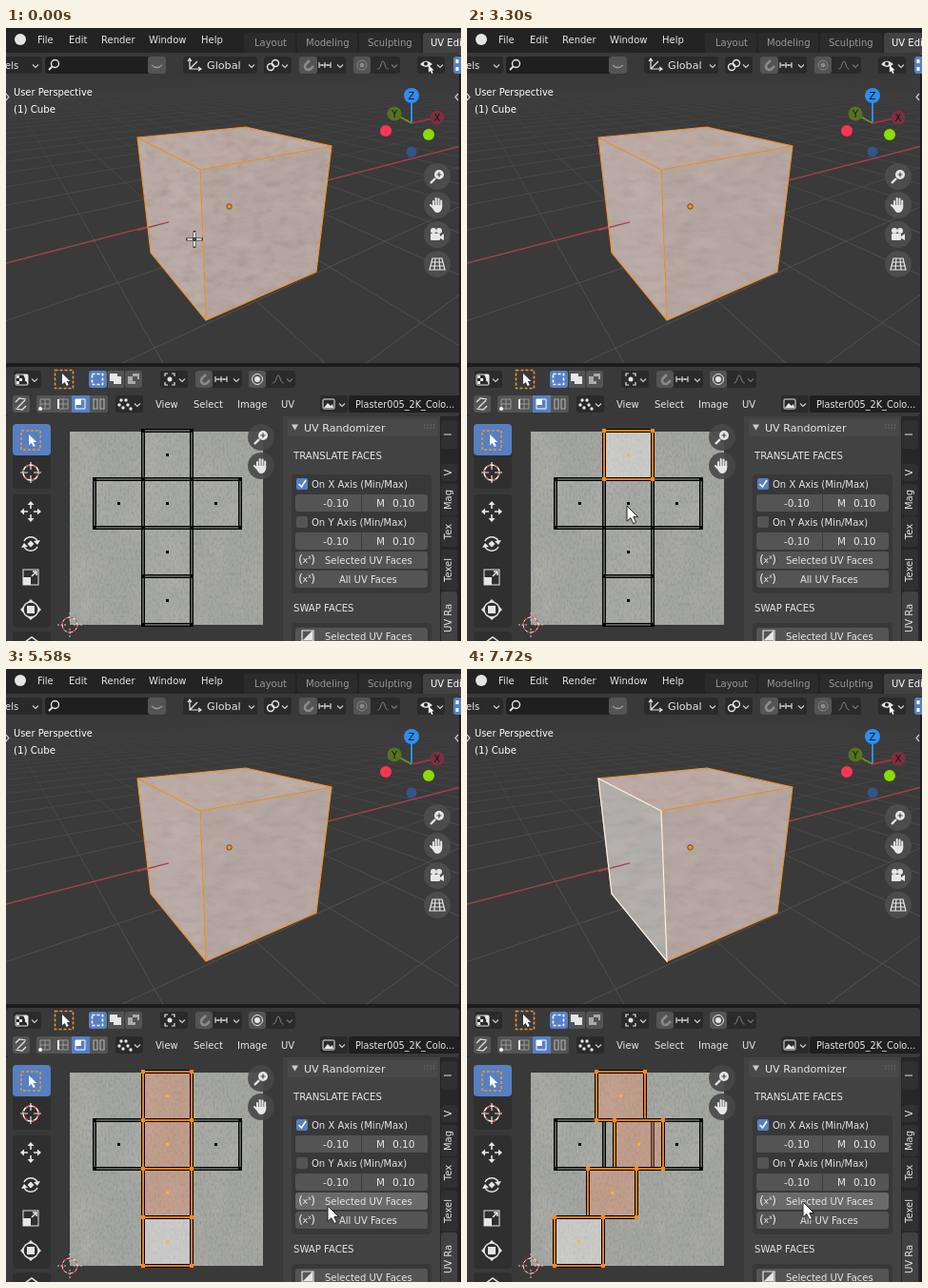
These frames come from a looping animation (478x644 px, 8000 ms). An HTML page:

```html
<!DOCTYPE html>
<html lang="en">
<head>
<meta charset="utf-8">
<title>UV face randomizer</title>
<style>
html, body { margin: 0; width: 100%; height: 100%; overflow: hidden; background: #1d1d1d; }
svg { display: block; width: 478px; height: 644px; }
text { font: 10px "DejaVu Sans", sans-serif; white-space: pre; }
</style>
</head>
<body>
<svg id="stage" viewBox="0 0 478 644" xmlns="http://www.w3.org/2000/svg"></svg>
<script>
const BLUE = '#5680c2', DARK = '#2a2a2a', BTN = '#545454', INK = '#e6e6e6', ORANGE = '#ef942f';

// --- drawing helpers, each returns markup ---
const rect = (x, y, w, h, fill, r = 0, more = '') =>
  `<rect x="${x}" y="${y}" width="${w}" height="${h}" rx="${r}" fill="${fill}" ${more}/>`;
const path = (d, stroke = INK, w = 1.2, fill = 'none', more = '') =>
  `<path d="${d}" stroke="${stroke}" stroke-width="${w}" fill="${fill}" ${more}/>`;
const disc = (x, y, r, fill, stroke = 'none', w = 1) =>
  `<circle cx="${x}" cy="${y}" r="${r}" fill="${fill}" stroke="${stroke}" stroke-width="${w}"/>`;
const text = (x, y, s, fill = INK, size = 10, more = '') =>
  `<text x="${x}" y="${y}" fill="${fill}" style="font-size:${size}px" ${more}>${s}</text>`;
const at = (x, y, s, scale = 1) => `<g transform="translate(${x} ${y}) scale(${scale})">${s}</g>`;
const poly = pts => 'M' + pts.map(p => p.join()).join('L') + 'Z';
const chevron = (x, y, c = '#ccc') => path(`M${x - 3} ${y - 1.5}l3 3l3-3`, c);

// --- icons, centred on 0,0 ---
const arrow = 'M0 0V16.2L3.8 12.7L6.8 18.6L9.6 17.3L6.8 11.6H11.6Z';
const pointer = at(-3, -6, path(arrow, 'none', 0, '#fff'), .7);
const magnet = path('M-5-2L-1 2A3.5 3.5 0 0 0 4-3L1-6', '#8a8a8a', 2.6, 'none', 'transform="rotate(90)"');
const ticks = path('M-6 0H6M-6-3V3M0-3V3M6-3V3M-3-1V1M3-1V1', INK, 1.1);
const falloff = path('M-7 5C-2 5-3-5 0-5S2 5 7 5', '#8a8a8a', 1.2);
const lens = disc(2, -2, 5, INK) + path('M-2 2L-7 7', INK, 2.4) + path('M-.5-2H4.5M2-4.5V.5', '#444', 1.2);
const hand = path('M-4 1V-4M-1.3 0V-7M1.5 0V-6.5M4.2 1V-4.5M-4 3L-7 0', INK, 2, 'none', 'stroke-linecap="round"') +
  path('M-5 0H5.2V3Q4 8 0 8Q-3 8-5 3Z', 'none', 0, INK);
const camera = rect(-7, -1, 10, 7, INK, 1) + path('M3 2L7-1V6L3 4Z', 'none', 0, INK) +
  disc(-4, -4, 3, INK) + disc(2, -4, 3, INK);
const gridIcon = path('M-5-6H5L8 6H-8ZM-6-2H6M-7 2H7M-2-6L-3 6M2-6L3 6', INK, 1.2);
const dashBox = (s, c = ORANGE) => rect(-s, -s, 2 * s, 2 * s, 'none', 0, `stroke="${c}" stroke-width="1.6" stroke-dasharray="3 2"`);
const pictureIcon = rect(-6, -5, 12, 10, 'none', 1, `stroke="${INK}"`) + path('M-5 4L-1-1L2 2L4 0L5 4Z', 'none', 0, INK);
const checker = rect(-6, -5, 13, 11, 'none', 1, `stroke="${INK}"`) +
  path('M-5-2.5H0M-2 .5H6M-5 3.5H0', INK, 3, 'none', 'stroke-dasharray="3 3"') + path('M2-5L7 6V-5Z', 'none', 0, INK);

// --- floor grid: plane to screen ---
function floor(x, y) {
  const w = 1 - .0978 * x - .1507 * y;
  return [(-79.45 * x + 1.68 * y + 234) / w, (-3.13 * x - 5.8 * y + 187) / w];
}
function floorLine(k, alongX) {
  const limit = alongX ? (1 - .1507 * k) / .0978 : (1 - .0978 * k) / .1507;
  const end = v => (alongX ? floor(v, k) : floor(k, v)).map(n => n.toFixed(1));
  return `M${end(Math.min(limit - .15, 16))}L${end(-40)}`;
}
let gridLines = '';
for (let k = -24; k <= 9; k++) {
  if (k && k < 6.6) gridLines += floorLine(k, true);
  gridLines += floorLine(k, false);
}

// --- cube ---
const top1 = [138, 115], back = [252, 104], right = [342, 124], front = [204, 149],
  lowL = [152, 236], lowF = [210, 307], lowR = [326, 256];
const sides = [
  { pts: [top1, back, right, front], fill: '#bba9a3' },
  { pts: [front, right, lowR, lowF], fill: '#b5a5a0' },
  { pts: [top1, front, lowF, lowL], fill: '#b9aaa5' }
];

const noise = (id, freq, seed, rgb, gain, cut) =>
  `<filter id="${id}" x="0" y="0" width="1" height="1" color-interpolation-filters="sRGB">
  <feTurbulence type="fractalNoise" baseFrequency="${freq}" numOctaves="4" seed="${seed}"/>
  <feColorMatrix values="0 0 0 0 ${rgb[0]} 0 0 0 0 ${rgb[1]} 0 0 0 0 ${rgb[2]} ${gain} 0 0 0 ${-gain * cut}"/></filter>`;

const defs = `<defs>
  ${noise('dark', '.5 .25', 4, [.35, .38, .36], .55, .42)}
  ${noise('light', '.03 .02', 9, [.75, .72, .7], .9, .46)}
  ${noise('soft', '.03 .045', 7, [.84, .77, .74], .6, .46)}
  ${noise('stain', '.05 .12', 21, [.55, .47, .43], .5, .46)}
  ${noise('rough', '.07 .1', 13, [.55, .46, .42], 3, .53)}
  <linearGradient id="fade" gradientUnits="userSpaceOnUse" x1="0" y1="50" x2="0" y2="230">
    <stop offset="0" stop-color="#505050" stop-opacity="0"/><stop offset="1" stop-color="#505050"/></linearGradient>
  <clipPath id="view">${rect(0, 53, 476, 299, '#000')}</clipPath>
  ${sides.map((s, i) => `<clipPath id="side${i}"><path d="${poly(s.pts)}"/></clipPath>`).join('')}
</defs>`;

const noiseRect = id => rect(40, 90, 400, 230, '#fff', 0, `filter="url(#${id})"`);
const cube = sides.map((s, i) => `<g clip-path="url(#side${i})">
  <path id="base${i}" d="${poly(s.pts)}" fill="${s.fill}"/>
  <g id="skin${i}">${noiseRect('soft')}${noiseRect('stain')}</g></g>`).join('') +
  `<g id="roughSkin" opacity=".22">${sides.map((s, i) => `<g clip-path="url(#side${i})">${noiseRect('rough')}</g>`).join('')}</g>`;

const topBar = rect(0, 0, 478, 26, '#232323') + disc(15, 12, 6, '#e4e4e4') +
  [[33, 'File'], [66, 'Edit'], [100, 'Render'], [150, 'Window'], [205, 'Help']].map(([x, s]) => text(x, 16, s)).join('') +
  [[250, 54, 'Layout', 261], [306, 63, 'Modeling', 315], [371, 65, 'Sculpting', 380]].map(([x, w, s, tx]) =>
    rect(x, 5, w, 21, '#2b2b2b', 3) + text(tx, 19, s, '#989898')).join('') +
  rect(438, 5, 50, 24, '#424242', 3) + text(446, 19, 'UV Editing', '#fff');

const viewHeader = rect(0, 26, 476, 27, '#393939') +
  rect(-5, 30, 43, 18, DARK, 3) + text(-1, 43, 'els') + chevron(31, 40) +
  rect(41, 30, 127, 18, '#1f1f1f', 3) + rect(149, 30, 19, 18, BTN, 3) + path('M153 39q5.5 5 11 0', '#999') +
  at(50, 39, disc(1.5, -1.5, 4, 'none', INK, 1.4) + path('M-1.5 1.5L-5 5', INK, 1.8)) +
  rect(186, 30, 78, 18, DARK, 3) + path('M193 33V43H204M193 43L201 35M191 35l2-3l2 3M202 41l3 2l-3 2', INK, 1.2) +
  text(211, 43, 'Global', INK, 11.2) + chevron(258, 40) +
  rect(271, 30, 29, 18, DARK, 3) + disc(283, 37, 3.5, 'none', INK, 1.4) + disc(278, 41, 3.5, 'none', INK, 1.4) + disc(280.5, 39, 1.2, INK) + chevron(293, 40) +
  rect(308, 30, 49, 18, DARK, 3) + rect(308, 30, 19, 18, BTN, 3) + at(317, 39, magnet) + at(335, 39, ticks) + chevron(351, 40) +
  rect(365, 30, 49, 18, DARK, 3) + rect(365, 30, 18, 18, BTN, 3) + disc(374, 39, 5, 'none', '#888') + disc(374, 39, 2.5, '#888') +
  at(396, 39, falloff, .8) + chevron(408, 40, '#777') +
  rect(432, 30, 29, 18, DARK, 3) + path('M435 38Q441 31 448 38Q441 44 435 38Z', 'none', 0, INK) + disc(441, 37.5, 2, '#222') +
  at(446, 43, pointer, .7) + chevron(456, 40) + rect(470, 30, 12, 18, BLUE, 3) + path('M474 33V37M474 41V45', '#fff', 3);

const gizmo = path('M426 100V72', '#2c8ff0', 2) + path('M426 100L453 94', '#a33047', 2) + path('M426 100L408 90', '#6b9320', 2) +
  disc(426, 130, 5.5, '#30568c') + disc(399, 108, 6, '#ff3653') + disc(444, 112, 6, '#8bdc00') +
  disc(408, 90, 7.5, '#54731f') + disc(453, 94, 7.5, '#7d2e40') + disc(426, 71, 8, '#2c8ff0') +
  [[426, 74.5, 'Z'], [453, 97.5, 'X'], [408, 93.5, 'Y']].map(([x, y, s]) => text(x, y, s, '#151515', 10, 'text-anchor="middle"')).join('');

const navButton = (x, y, icon) => disc(x, y, 14, '#4c4c4c') + at(x, y, icon);

const viewport = rect(0, 53, 476, 299, '#3a3a3a') +
  `<g clip-path="url(#view)">${path(gridLines, 'url(#fade)', 1)}${path('M0 247L478 124', '#a3424e', 1.3)}</g>` +
  cube + path('M138 212.5L171 203.8', '#a3424e', 1.3) +
  path(poly([top1, back, right, lowR, lowF, lowL]) + 'M138 115L204 149L342 124M204 149L210 307', ORANGE, 1.1) +
  path(poly([top1, front, lowF, lowL]), '#f4f4f4', 1.2, 'none', 'id="activeEdge"') +
  disc(234.5, 187.5, 2.7, ORANGE, '#6b431c') +
  text(8, 71, 'User Perspective', '#fff', 9.9) + text(8, 89, '(1) Cube', '#fff', 10.2) +
  path('M0 69l3 3.5l-3 3.5M475 69l-3 3.5l3 3.5', '#ccc') + gizmo +
  navButton(453, 156, lens) + navButton(453, 186, hand) + navButton(453, 217, camera) + navButton(453, 248, gridIcon);

const uvHeader = rect(0, 356, 476, 52, '#393939', 3) +
  rect(8, 360, 29, 18, DARK, 3) + at(16, 369, checker) + chevron(30, 370) +
  at(61, 369, dashBox(9.5) + at(1, 0, pointer)) +
  rect(87, 360, 19, 18, BLUE, 3) + rect(107, 360, 17, 18, BTN) + rect(125, 360, 18, 18, BTN, 3) +
  at(96, 369, dashBox(5.5, '#fff')) + path('M109 363h8v3h4v8h-8v-3h-4Z', 'none', 0, INK) + path('M128 366h5v-3h7v6h-4v5h-8Z', 'none', 0, '#aaa') +
  rect(133, 366, 5, 5, BTN) +
  rect(162, 360, 29, 18, DARK, 3) + disc(172, 369, 2.5, INK) + path('M167 366V363H170M174 363H177V366M177 372V375H174M170 375H167V372') + chevron(185, 370) +
  rect(199, 360, 49, 18, DARK, 3) + rect(199, 360, 18, 18, BTN, 3) + at(208, 369, magnet) + at(226, 369, ticks) + chevron(242, 370) +
  rect(255, 360, 49, 18, DARK, 3) + rect(255, 360, 18, 18, BTN, 3) + disc(264, 369, 5.5, 'none', INK) + disc(264, 369, 3, INK) +
  at(286, 369, falloff, .8) + chevron(298, 370, '#777') +
  rect(7, 386, 18, 18, BTN, 3) + path('M10 393L14 389L21 390M21 397L17 401L10 400M12 399L20 391', INK) +
  rect(32, 386, 75, 18, BTN, 3) + rect(69, 386, 19, 18, BLUE) +
  path('M36 390h10v10h-10ZM55 390h10v10h-10ZM41 390v10M36 395h10M60 390v10M55 395h10', '#999', 1) +
  disc(36, 400, 2, '#fff') + path('M55 390V400', '#fff', 2) +
  path('M73 390h10v10h-10Z', '#fff', 1) + rect(73, 390, 6, 6, '#fff') + path('M92 390h4v10h-4ZM99 390h4v10h-4Z', '#aaa', 1.2) +
  rect(115, 386, 29, 18, DARK, 3) + [[121, 391], [126, 391], [119, 396], [128, 396], [123, 399], [131, 400]].map(p => disc(...p, 1.7, INK)).join('') + chevron(138, 396) +
  rect(150, 385, 39, 20, BLUE, 3, 'id="viewHover"') +
  [[157, 'View'], [197, 'Select'], [243, 'Image'], [289, 'UV']].map(([x, s]) => text(x, 399, s)).join('') +
  rect(330, 386, 29, 18, DARK, 3) + at(339, 395, pictureIcon) + chevron(353, 396) +
  rect(360, 386, 120, 18, '#1f1f1f', 3) + text(367, 399, 'Plaster005_2K_Colo...', INK, 9.7);

const TOOL = '#2f2f2f';
const tools = rect(7, 416, 40, 68, TOOL, 4) + rect(7, 416, 40, 33, BLUE, 4) + rect(7, 490, 40, 140, TOOL, 4) + rect(7, 634, 40, 20, TOOL, 4) +
  at(26, 433, dashBox(10) + at(1, 0, pointer)) +
  at(26, 467, disc(0, 0, 8, 'none', '#fff', 1.5) + `<circle r="8" fill="none" stroke="#e04b4b" stroke-width="1.5" stroke-dasharray="4 4"/>` + path('M-11 0H-3M3 0H11M0-11V-3M0 3V11')) +
  at(26, 508, path('M-8 0H-3M3 0H8M0-8V-3M0 3V8', INK, 1.6) + path('M0-11l3.5 4h-7ZM0 11l3.5-4h-7ZM-11 0l4-3.5v7ZM11 0l-4-3.5v7Z', 'none', 0, INK)) +
  at(26, 542, path('M-7-3A8 8 0 0 1 7-3M7 3A8 8 0 0 1-7 3', INK, 1.5) + path('M0-3.5L3.5 0L0 3.5L-3.5 0ZM10-4l-3 5l-4-4ZM-10 4l3-5l4 4Z', 'none', 0, INK)) +
  at(26, 577, rect(-8, -8, 16, 16, 'none', 0, `stroke="${INK}"`) + rect(-8, 0, 8, 8, INK) + path('M1-1L6-6M2-6H6V-2', INK, 1.5)) +
  at(26, 611, disc(0, 0, 8, 'none', INK, 1.4) + rect(-4, -4, 8, 8, INK) + path('M0-11l3 3h-6ZM0 11l3-3h-6ZM-11 0l3-3v6ZM11 0l-3-3v6Z', 'none', 0, INK)) +
  path('M20 645L27 640L34 645', INK, 1.5);

const uvEditor = rect(0, 408, 292, 236, '#393939') + tools +
  rect(67, 424, 203, 203, '#a4a6a1') + rect(67, 424, 203, 203, '#fff', 0, 'filter="url(#light)"') +
  rect(67, 424, 203, 203, '#fff', 0, 'filter="url(#dark)"') +
  '<g id="faces"></g>' +
  at(67, 627, path('M-13 0H-4M4 0H13M0-13V-4M0 4V13', '#ccc', 1, 'none', 'stroke-dasharray="2 1.5"') + disc(0, 0, 8, 'none', '#eee', 1) +
    '<circle r="8" fill="none" stroke="#e02020" stroke-width="1.1" stroke-dasharray="3.2 3.1"/>') +
  `<g opacity=".9">${disc(268, 430, 14, '#484848')}${disc(268, 460, 14, '#484848')}</g>` + at(268, 430, lens) + at(268, 460, hand);

const fields = y => rect(304, y, 139, 18, BTN, 3) + path(`M373.5 ${y}v18`, '#3c3c3c', 1) +
  text(333, y + 13, '-0.10', INK, 10.4) + text(389, y + 13, 'M', INK, 10.4) + text(406, y + 13, '0.10', INK, 10.6);
const button = (y, x, label, id = '') => rect(304, y, 139, 18, BTN, 3, id) + text(x, y + 12.5, label);
const funcIcon = y => text(307, y, '(', INK, 13) + text(311.5, y - 1, 'x', INK, 9.5) + text(317, y - 5, 'x', INK, 6.5) + text(320, y, ')', INK, 13);
const sideTabs = [[412, 30, 'I'], [458, 18, 'V'], [479, 33, 'Mag'], [513, 32, 'Tex'], [548, 43, 'Texel'], [592, 60, 'UV Ra']];

const panel = rect(291, 408, 185, 236, '#424242') + rect(296, 411, 158, 18, '#494949', 3) +
  path('M300 416.5h7l-3.5 6Z', 'none', 0, '#ccc') + text(313, 423.6, 'UV Randomizer', INK, 11.1) +
  path('M439 417H451M439 420H451', '#777', 1.2, 'none', 'stroke-dasharray="1.3 2"') +
  text(302, 453, 'TRANSLATE FACES', INK, 10.1) + rect(300, 469, 147, 125, '#383838', 4) +
  rect(305, 473, 12, 12, BLUE, 2) + path('M307.5 479l3 3l4.5-7', '#fff', 1.6) + text(321, 483, 'On X Axis (Min/Max)') + fields(490) +
  rect(305, 513, 12, 12, BTN, 2) + text(321, 523, 'On Y Axis (Min/Max)') + fields(530) +
  button(550, 335, 'Selected UV Faces', 'id="run"') + button(570, 350, 'All UV Faces') + funcIcon(563) + funcIcon(583) +
  text(302, 613, 'SWAP FACES', INK, 10.1) + rect(300, 625, 147, 30, '#383838', 4) + button(630, 335, 'Selected UV Faces') +
  path('M311 633h12v11h-12Z', INK, 1.2) + path('M312 643l10-10v10Z', 'none', 0, INK) +
  rect(456, 408, 20, 236, '#262626') +
  sideTabs.map(([y, h, s], i) => rect(457, y, 17, h, i == 5 ? '#424242' : '#303030', 3) +
    text(0, 0, s, INK, 10, `text-anchor="middle" transform="translate(468 ${i == 5 ? 620 : y + h / 2}) rotate(-90)"`)).join('');

const cross = 'M-7.5 0H-2M2 0H7.5M0-7.5V-2M0 2V7.5';
const stage = document.getElementById('stage');
stage.innerHTML = defs + rect(0, 0, 478, 644, '#1d1d1d') + topBar + viewHeader + viewport + uvHeader + uvEditor + panel +
  `<g id="cross">${path(cross, '#333', 2.8, 'none', 'stroke-linecap="square"')}${path(cross, '#fff', 1.6)}</g>` +
  path(arrow, '#222', 1, '#fff', 'id="arrow"');
const $ = id => document.getElementById(id);

// --- timeline ---
const moves = [
  [0, 198, 222], [1000, 185, 236], [1160, 125, 295], [1300, 63, 346], [1440, 100, 382], [1580, 157, 402],
  [1720, 166, 420], [1860, 168, 431], [2160, 165, 438], [2300, 162, 444], [2860, 163, 452], [3000, 165, 470],
  [3160, 167, 490], [3300, 168, 502], [4300, 168, 510], [4440, 168, 538], [4580, 168, 575], [4710, 168, 599],
  [5160, 185, 596], [5300, 235, 585], [5440, 300, 571], [5580, 338, 564], [5720, 349, 561], [5860, 353, 560]
];
const shifts = [[0, 0, 0, 0, 0], [6160, -4, -6, -9, -20], [6720, -7, 1, -13, -37], [7580, -8, 11, -17, -52]];
const picks = [[0, 0, -1], [2440, 1, 0], [4020, 2, 1], [4850, 4, 3]]; // time, selected count, active face
const presses = [6020, 6580, 7440];
const last = (list, t) => list.filter(e => e[0] <= t).pop();

const CELL = 51;
const TINTS = ['rgba(255,255,255,.03)', 'rgba(243,140,100,.34)', 'rgba(255,255,255,.4)'];
function face(x, row, state) {
  const y = 423 + row * CELL;
  const box = (fill, stroke, w) => rect(x, y, CELL, CELL, fill, 0, `stroke="${stroke}" stroke-width="${w}"`);
  const dots = [[0, 0], [1, 0], [0, 1], [1, 1]].map(([i, j]) =>
    rect(x + i * CELL - 2, y + j * CELL - 2, 4, 4, state ? '#ff8a1c' : '#000')).join('');
  return box(TINTS[state], '#000', 4) + box('none', state ? '#ee7d16' : '#8e918c', state ? 2 : 1.2) + dots +
    rect(x + CELL / 2 - 1.5, y + CELL / 2 - 1.5, 3, 3, state ? '#ffb81c' : '#000');
}

function draw(t) {
  const [, x, y] = last(moves, t), [, count, active] = last(picks, t), [, ...shift] = last(shifts, t);
  const inView = y < 356, place = `translate(${x} ${y})`, moved = t >= 6160;
  $('cross').setAttribute('transform', place);
  $('arrow').setAttribute('transform', place);
  $('cross').style.display = inView ? '' : 'none';
  $('arrow').style.display = inView ? 'none' : '';
  $('viewHover').style.display = x > 149 && x < 189 && y > 384 && y < 405 ? '' : 'none';
  const over = x > 303 && x < 444 && y > 549 && y < 569;
  $('run').setAttribute('fill', presses.some(p => t >= p && t < p + 140) ? BLUE : over ? '#6a6a6a' : BTN);

  $('faces').innerHTML = face(93, 1, 0) + face(195, 1, 0) +
    [0, 1, 2, 3].sort((a, b) => (a < count) - (b < count))
      .map(i => face(144 + shift[i], i, i == active ? 2 : +(i < count))).join('');

  $('roughSkin').style.display = t < 160 ? '' : 'none';
  $('activeEdge').style.display = moved ? '' : 'none';
  $('base2').setAttribute('fill', moved ? '#b0aeaa' : sides[2].fill);
  [shift[0], shift[1], shift[3]].forEach((s, i) => $('skin' + i).setAttribute('transform', `translate(${s} 0)`));
}

const steps = [...new Set([160, ...[moves, shifts, picks].flat().map(e => e[0]), ...presses.flatMap(p => [p, p + 140])])];
let shown = -1;
function tick(now) {
  const t = now % 8000, step = steps.filter(s => s <= t).length;
  if (step != shown) draw(t);
  shown = step;
  requestAnimationFrame(tick);
}
tick(performance.now());
</script>
</body>
</html>
```
